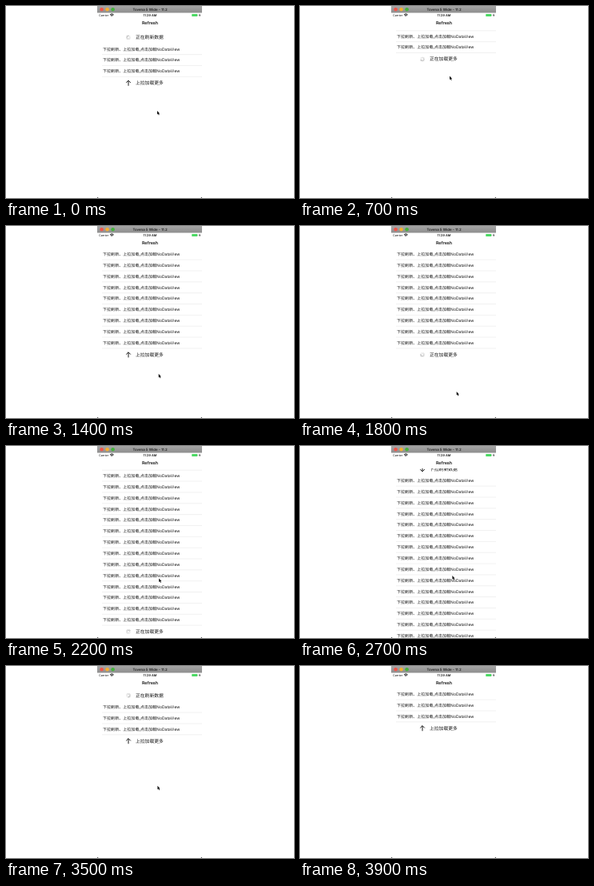
Animation of 360x240 px, one loop 4000 ms. Source, as an HTML page with a canvas:

```html
<!DOCTYPE html>
<html lang="zh-CN">
<head>
<meta charset="utf-8">
<style>
html, body { margin: 0; width: 100%; height: 100%; overflow: hidden; background: #fff; }
canvas { display: block; width: 360px; height: 240px; }
</style>
</head>
<body>
<canvas id="stage"></canvas>
<script>
const LOOP = 4000, STEP = 100, SETTLE = 200;
const LEFT = 114, RIGHT = 245, MIDDLE = 180, NAV_BOTTOM = 28;
const FIRST_ROW = 35.2, PITCH = 13.85, PAGE = 6;
const FONT = 'Inter, "Noto Sans CJK SC", sans-serif';
const INK = '#111';

const canvas = document.getElementById('stage');
const ratio = window.devicePixelRatio || 1;
canvas.width = 360 * ratio;
canvas.height = 240 * ratio;
const ctx = canvas.getContext('2d');
ctx.scale(ratio, ratio);
ctx.textRendering = 'geometricPrecision';

function ease(u) {
  u = Math.min(1, Math.max(0, u));
  return u * u * (3 - 2 * u);
}

// Rises from 0 to 1 after start and falls back to 0 by end
const pulse = (t, start, end) => ease((t - start) / SETTLE) * ease((end - t) / SETTLE);
const within = (t, start, end) => t >= start && t < end;

// The list is pulled down to refresh and pulled up to load more
const scrollAt = t =>
  18.5 * pulse(t, -SETTLE, 400) - 11.3 * pulse(t, 400, 1200)
  - 11.9 * pulse(t, 1900, 2600) + 16 * pulse(t, 2600, 3800);

const rowsAt = t => 3 + (t < 3500 ? PAGE * [1100, 1900, 2500].filter(load => t >= load).length : 0);

function cursorAt(t) {
  const stops = [[0, 189, 131], [700, 187, 87.5], [1200, 189, 177], [1800, 195.7, 207],
    [2200, 191.2, 165.5], [3200, 189.6, 158.5], [LOOP, 189, 131]];
  const next = stops.findIndex(stop => stop[0] > t);
  const [t0, x0, y0] = stops[next - 1], [t1, x1, y1] = stops[next];
  const u = ease((t - t0) / (t1 - t0));
  return [x0 + (x1 - x0) * u, y0 + (y1 - y0) * u];
}

function placed(x, y, degrees, draw) {
  ctx.save();
  ctx.translate(x, y);
  ctx.rotate(degrees * Math.PI / 180);
  draw();
  ctx.restore();
}

// Laid out at ten times the size, so that small glyphs keep even spacing
function text(str, x, y, size, weight = 400, align = 'left') {
  placed(x, y + size * 0.37, 0, () => {
    ctx.scale(0.1, 0.1);
    ctx.font = `${weight} ${size * 10}px ${FONT}`;
    ctx.textAlign = align;
    ctx.fillStyle = INK;
    ctx.fillText(str, 0, 0);
  });
}

function line(color, width, ...points) {
  ctx.strokeStyle = color;
  ctx.lineWidth = width;
  ctx.beginPath();
  points.forEach(p => ctx.lineTo(...p));
  ctx.stroke();
}

function rect(color, x, y, w, h) {
  ctx.fillStyle = color;
  ctx.fillRect(x, y, w, h);
}

function arrow() {
  line(INK, 0.95, [0, 3.5], [0, -3]);
  line(INK, 0.95, [-2.8, -0.3], [0, -3.1], [2.8, -0.3]);
}

function spinner(t) {
  const head = Math.floor(t / 1000 * 12);
  for (let i = 0; i < 12; i++) {
    const age = (head - i + 12) % 12;
    placed(0, 0, i * 30, () => line(`rgba(90, 90, 90, ${0.85 - age * 0.06})`, 0.55, [0, -1.4], [0, -2.8]));
  }
}

function statusRow(y, label, busy, turn, t) {
  placed(153, y + 0.3, busy ? 0 : turn, () => busy ? spinner(t) : arrow());
  text(label, 162, y, 5.8);
}

function list(t) {
  const rows = rowsAt(t);
  const refreshing = t < 300 || within(t, 2900, 3700);
  const loading = within(t, 600, 1100) || within(t, 1600, 2500);
  ctx.save();
  ctx.beginPath();
  ctx.rect(LEFT, NAV_BOTTOM, RIGHT - LEFT, 240);
  ctx.clip();
  ctx.translate(0, scrollAt(t));

  statusRow(20.5, refreshing ? '正在刷新数据' : '下拉刷新数据', refreshing, 180, t);
  for (let i = 0; i < rows; i++) {
    const y = FIRST_ROW + i * PITCH;
    text('下拉刷新、上拉加载,点击加载NoDataView', 121, y, 5.05);
    line('#e2e2e2', 0.5, [120, y + PITCH / 2], [RIGHT, y + PITCH / 2]);
  }
  const turn = -180 * pulse(t, 400, 1300);
  statusRow(FIRST_ROW + rows * PITCH + 0.7, loading ? '正在加载更多' : '上拉加载更多', loading, turn, t);
  ctx.restore();
}

function chrome() {
  const bar = ctx.createLinearGradient(0, 0, 0, 8.5);
  bar.addColorStop(0, '#a6a6a6');
  bar.addColorStop(1, '#8e8e8e');
  rect(bar, LEFT, 0, RIGHT - LEFT, 8.5);
  ['#f0564c', '#f4b030', '#45b23c'].forEach((color, i) => {
    ctx.fillStyle = color;
    ctx.beginPath();
    ctx.arc(119.6 + i * 7, 4.2, 2.3, 0, 7);
    ctx.fill();
  });
  text('Tovena 5 Wide - 11.2', MIDDLE, 4.3, 4.4, 500, 'center');

  text('Carrier', 116, 11.5, 3.7);
  for (let r = 1; r < 4; r += 1.2) {
    ctx.strokeStyle = INK;
    ctx.lineWidth = 0.85;
    ctx.beginPath();
    ctx.arc(132.3, 13.3, r, -Math.PI * 0.75, -Math.PI * 0.25);
    ctx.stroke();
  }
  text('11:29 AM', MIDDLE, 11.5, 3.9, 600, 'center');
  rect('#4cd964', 232.3, 10, 6.9, 3);
  rect('#999', 239.5, 10.8, 0.6, 1.4);
  line(INK, 0.6, [242.4, 9.9], [241.5, 11.5], [242.8, 11.5], [241.9, 13.1]);
  text('Refresh', MIDDLE, 21.5, 5.4, 600, 'center');

  for (const x of [LEFT, RIGHT - 1.2]) rect('#555', x, 239, 1.2, 1);
}

function cursor(t) {
  if (t >= 3800) return;
  placed(...cursorAt(t), 0, () => {
    ctx.fillStyle = INK;
    ctx.fill(new Path2D('M0 0V4.6L1.1 3.7L1.9 5.5L2.7 5.1L2 3.4H3.2Z'));
  });
}

function frame() {
  const t = Math.floor((performance.now() - start) % LOOP / STEP) * STEP;
  rect('#fff', 0, 0, 360, 240);
  list(t);
  chrome();
  cursor(t);
  requestAnimationFrame(frame);
}

const start = performance.now();
frame();
</script>
</body>
</html>
```
